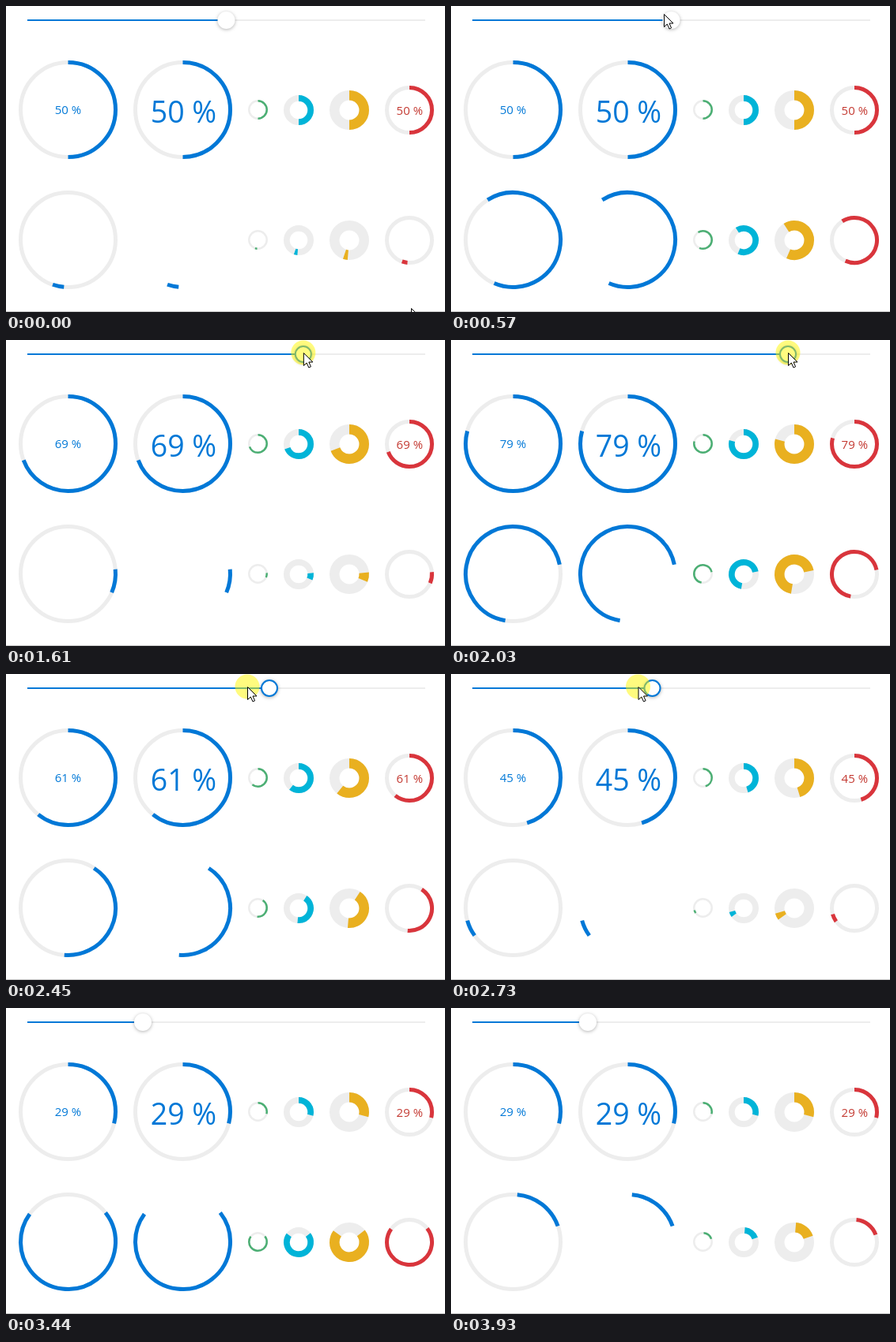
Animation, 555 px wide and 388 px high, one loop 4 s. Source, as an HTML page:

```html
<!DOCTYPE html>
<html lang="en">
<head>
<meta charset="utf-8">
<title>Progress rings</title>
<style>
  html, body { margin: 0; width: 100%; height: 100%; overflow: hidden; background: #fff; }
  svg { display: block; }
  text { font-family: "Open Sans", "Noto Sans", sans-serif; text-anchor: middle; }
  #thumb { filter: drop-shadow(0 1px 2px rgba(0, 0, 0, .3)); }
</style>
</head>
<body>
<svg id="stage" width="555" height="388" viewBox="0 0 555 388">
  <rect width="555" height="388" fill="#fff"/>
  <rect y="387" width="555" height="1" fill="#c6c6c6"/>
  <rect x="27" y="17" width="503" height="2" fill="#ededed"/>
  <rect id="fill" x="27" y="17" height="2" fill="#0078d7"/>
  <g id="rings"></g>
  <circle id="thumb" cy="18" fill="#fff" stroke="#0078d7"/>
  <circle id="glow" r="15.5" fill="#fff700" fill-opacity=".5"/>
  <path id="cursor" d="M.5 .5V16.5L4.3 13 7 19 9.6 17.8 7 12H12Z" fill="#fff" stroke="#000" stroke-linejoin="round"/>
</svg>
<script>
const LOOP = 4000, BLUE = '#0078d7', TRACK = '#ededed';
const $ = id => document.getElementById(id);

function add(tag, attrs) {
  const el = document.createElementNS('http://www.w3.org/2000/svg', tag);
  set(el, attrs);
  $('rings').appendChild(el);
  return el;
}
function set(el, attrs) {
  for (const k in attrs) el.setAttribute(k, attrs[k]);
}

// size: outer radius, w: stroke width, label: [font size, x, baseline, colour]
const specs = [
  { x: 78.5, y: 131.5, size: 62.5, w: 5, color: BLUE, label: [15, 78.5, 137, BLUE] },
  { x: 223.5, y: 131.5, size: 62.5, w: 5, color: BLUE, label: [37.5, 224.5, 148, BLUE], bare: true },
  { x: 318.5, y: 131.5, size: 12.5, w: 2.5, color: '#4caf74' },
  { x: 370, y: 132, size: 19, w: 7.7, color: '#00b4d8' },
  { x: 434, y: 132, size: 25, w: 12.5, color: '#e9b020' },
  { x: 510, y: 132, size: 31, w: 5, color: '#d9353c', label: [15, 510.3, 138, '#c43a32'] }
];

function ring(s, dy, track) {
  const base = { cx: s.x, cy: s.y + dy, r: s.size - s.w / 2, fill: 'none', 'stroke-width': s.w };
  if (track) add('circle', { ...base, stroke: TRACK });
  const arc = add('circle', { ...base, stroke: s.color, pathLength: 360 });
  return (from, len) => set(arc, {
    'stroke-dasharray': `${len} ${360 - len}`,
    transform: `rotate(${from - 90} ${s.x} ${s.y + dy})`
  });
}

const gauges = specs.map(s => ring(s, 0, true));
const spinners = specs.map(s => ring(s, 165, !s.bare));
const labels = specs.filter(s => s.label).map(({ label: [size, x, y, fill] }) =>
  add('text', { 'font-size': size, x, y, fill }));

// Keys: [time, ...values], linear between
function track(keys, t) {
  const i = keys.findIndex(k => k[0] > t);
  if (i < 0) return keys[keys.length - 1].slice(1);
  const a = keys[i - 1], b = keys[i], u = (t - a[0]) / (b[0] - a[0]);
  return a.slice(1).map((v, j) => v + (b[j + 1] - v) * u);
}

const thumbKeys = [[0, 278.5], [850, 278.5], [1130, 305], [1950, 426], [2150, 426],
  [2450, 333], [3010, 176], [3100, 173]];
const cursorKeys = [[0, 512, 383], [480, 269, 10], [580, 269, 10], [720, 279, 16], [850, 279, 16],
  [1130, 305, 16], [1950, 426, 16], [2110, 426, 16], [2450, 305, 16], [3010, 168, 16],
  [3100, 173, 16], [3180, 173, 16], [3400, 300, 400]];

// Steady rotation; the head runs ahead, then the tail catches up
const SWEEP = 690;
const headSteps = [[20, 225], [1440, 228], [2875, 236]];
const tailSteps = [[752, 217], [2118, 230], [3504, 230]];
const ease = u => u < .5 ? 8 * u ** 4 : 1 - 8 * (1 - u) ** 4;
const advance = (steps, t) => steps.reduce((sum, [start, turn]) =>
  sum + turn * ease(Math.min(1, Math.max(0, (t - start) / SWEEP))), 0);

// The picture holds for 70 ms at a time
function hold(t) {
  const n = Math.min(56, Math.floor(t / 70));
  return n * 70 + ((n > 4 && n < 20) || n > 45 ? 10 : 0);
}

function draw(time) {
  const t = hold(time % LOOP);
  const [x] = track(thumbKeys, t);
  const [cx, cy] = track(cursorKeys, t);
  const value = (x - 27) / 503;
  const pressed = t > 760 && t < 3150;

  set($('fill'), { width: x - 27 });
  set($('thumb'), { cx: x, r: pressed ? 10 : 11, 'stroke-width': pressed ? 2 : 0 });
  set($('glow'), { cx, cy, visibility: pressed ? 'visible' : 'hidden' });
  set($('cursor'), { transform: `translate(${cx} ${cy})` });

  gauges.forEach(g => g(0, value * 360));
  labels.forEach(l => { l.textContent = Math.round(value * 100) + ' %'; });

  const turned = advance(tailSteps, t);
  const from = (185 + t * .25 + turned) % 360;
  const len = 14 + advance(headSteps, t) - turned;
  spinners.forEach(s => s(from, len));
}

const began = performance.now();
function tick() {
  draw(performance.now() - began);
  requestAnimationFrame(tick);
}
tick();
</script>
</body>
</html>
```
